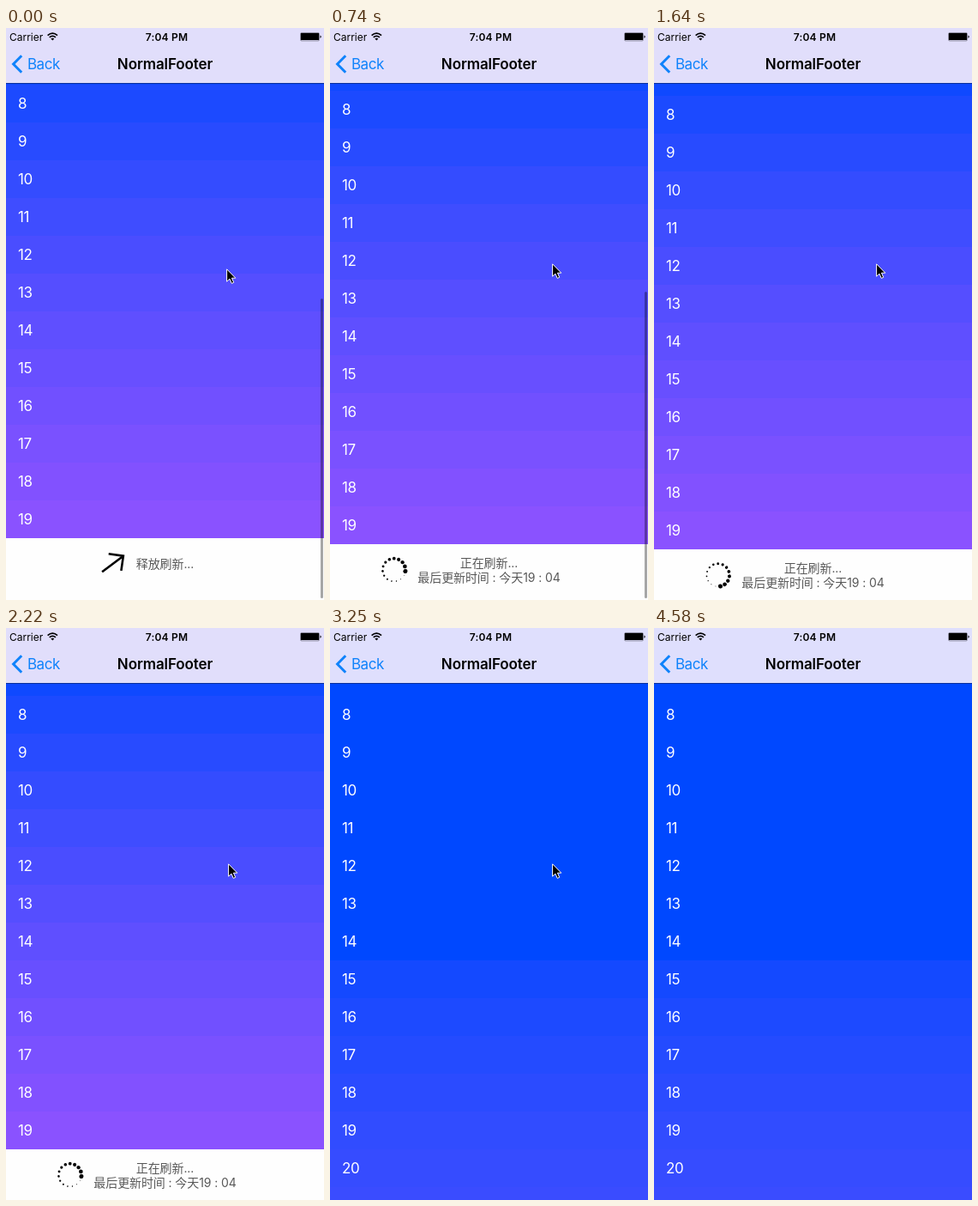
These frames come from a looping animation (371x666 px, 5000 ms). An HTML page:

```html
<!DOCTYPE html>
<html lang="zh">
<head>
<meta charset="utf-8">
<title>NormalFooter</title>
<style>
  html, body { margin: 0; width: 100%; height: 100%; overflow: hidden; background: #fefefe; }
  svg { display: block; width: 371px; height: 666px; }
  text { font-family: Inter, "Noto Sans CJK SC", "Noto Sans CJK", sans-serif; white-space: pre; }
  .row { font-size: 17px; fill: #fff; letter-spacing: -.4px; }
  .note { font-size: 14px; fill: #585858; text-anchor: middle; letter-spacing: -.1px; }
  .title { font-size: 17px; font-weight: 600; text-anchor: middle; letter-spacing: -.1px; }
  .back { font-size: 17px; fill: #1083fb; letter-spacing: -.5px; }
  .status { font-size: 12px; }
  .clock { font-weight: 600; text-anchor: middle; letter-spacing: .2px; }
  rect { shape-rendering: crispEdges; }
</style>
</head>
<body>
<svg viewBox="0 0 371 666">
  <rect width="371" height="666" fill="#fefefe"/>
  <g id="before"></g>
  <g id="after"></g>
  <g id="footer">
    <g id="pull">
      <path id="arrow" d="M-15.5 0H15.5M3.2 -12.2L15.5 0L3.2 12.2" fill="none" stroke="#000" stroke-width="2.6"/>
      <text class="note" x="185.5" y="35">释放刷新...</text>
    </g>
    <g id="load">
      <g id="dots"></g>
      <text class="note" x="185.5" y="27">正在刷新...</text>
      <text class="note" x="185.5" y="43.5">最后更新时间 : 今天19 : 04</text>
    </g>
  </g>
  <rect id="thumb" x="367" width="3" rx="1.5" fill="#000" style="shape-rendering:auto"/>
  <rect id="nav" width="371" height="64"/>
  <rect y="64" width="371" height="1" fill="#0a2f9c"/>
  <text class="status" x="4" y="14.5">Carrier</text>
  <g fill="none" stroke="#000" stroke-width="1.7">
    <path d="M48.6 8.6Q54.3 3.6 60 8.6M50.7 10.9Q54.3 7.8 57.9 10.9"/>
    <path d="M54.3 14.6L52.3 12.5Q54.3 10.9 56.3 12.5Z" fill="#000" stroke="none"/>
  </g>
  <text class="status clock" x="187.5" y="14.5">7:04 PM</text>
  <rect x="343.5" y="5.5" width="22" height="9.5" rx="1.5" fill="none" stroke="#000" stroke-width=".7" opacity=".5" style="shape-rendering:auto"/>
  <rect x="344" y="6" width="21" height="8"/>
  <path d="M366.5 8.5Q369 10.2 366.5 12Z"/>
  <path d="M18.2 32.3L8.6 42L18.2 51.7" fill="none" stroke="#1083fb" stroke-width="3"/>
  <text class="back" x="25" y="48">Back</text>
  <text class="title" x="185.5" y="48">NormalFooter</text>
  <path id="cursor" d="M.6 .8V15.2L3.9 12.1L6.3 17.4L8.7 16.3L6.4 11.2H10.8Z" fill="#000" stroke="#fff" stroke-width="1" stroke-linejoin="round"/>
</svg>
<script>
const LOOP = 5000, RELOAD = 3250, LOADING = 740;
const $ = id => document.getElementById(id);

function add(parent, tag, attrs, text) {
  const el = document.createElementNS('http://www.w3.org/2000/svg', tag);
  for (const k in attrs) el.setAttribute(k, attrs[k]);
  if (text !== undefined) el.textContent = text;
  parent.append(el);
  return el;
}

// Rows sit at 44px pitch; y = 0 is the top of row 8.
function list(parent, last, red) {
  for (let n = 7; n <= last; n++) {
    const y = (n - 8) * 44, r = Math.round(red(n));
    add(parent, 'rect', { y, width: 371, height: 44, fill: `rgb(${r},${Math.round(72 + r / 14)},255)` });
    add(parent, 'text', { class: 'row', x: 14, y: y + 28 }, n);
  }
}
const curve = (k, base, slope, bend) => base + k * (slope - k * bend);
list($('before'), 19, n => curve(n - 8, 28, 12.5, .23));
list($('after'), 21, n => n < 15 ? 0 : curve(n - 15, 20, 9, .45));
$('after').setAttribute('transform', 'translate(0 79)');

const DOTS = 15;
for (let i = 0; i < DOTS; i++) {
  const a = -i * 2 * Math.PI / DOTS;
  add($('dots'), 'circle', { cx: 13.3 * Math.cos(a), cy: 13.3 * Math.sin(a), r: 2.5 * (1 - .9 * i / DOTS) });
}

// time, list end, thumb top, thumb opacity
const scroll = [
  [0, 594, 315, .35], [150, 593, 316, .35], [300, 592, 317, .35], [450, 591, 318, .35],
  [740, 601, 307, .35], [890, 606, 275, .35], [1040, 607, 267, .3],
  [1340, 607, 267, .18], [1490, 607, 267, 0]
];
// time, x, y
const pointer = [
  [0, 257, 280], [150, 257, 278], [300, 258, 276], [450, 259, 274],
  [3550, 259, 290], [3700, 261, 345], [3840, 264, 401],
  [4140, 270, 435], [4290, 297, 497], [4430, 312, 630], [4580, 320, 700]
];
const at = (steps, t) => steps.findLast(s => s[0] <= t);
const move = (el, x, y, rot = 0) => el.setAttribute('transform', `translate(${x} ${y}) rotate(${rot})`);
const show = (el, on) => el.setAttribute('visibility', on ? 'visible' : 'hidden');

function draw(t) {
  const [, end, top, alpha] = at(scroll, t);
  const [, x, y] = at(pointer, t);
  const done = t >= RELOAD, loading = t >= LOADING;
  show($('before'), !done);
  show($('after'), done);
  show($('pull'), !loading);
  show($('load'), loading && !done);
  show($('thumb'), !done);
  move($('before'), 0, end - 528);
  move($('footer'), 0, end);
  move($('arrow'), 124.5, 30, t < 150 ? -37 : -90);
  // The spinner advances three dots per tick; a dot always sits at the very top.
  const tick = Math.floor((t - LOADING + 6) / 147.5);
  move($('dots'), 74.7, 30, 6 + tick * 72);
  $('thumb').setAttribute('y', top);
  $('thumb').setAttribute('height', 664 - top);
  $('thumb').setAttribute('opacity', alpha);
  $('nav').setAttribute('fill', done ? '#dfdffd' : '#e1defb');
  move($('cursor'), x, y);
}

const start = performance.now();
function frame() {
  draw((performance.now() - start) % LOOP);
  requestAnimationFrame(frame);
}
draw(0);
requestAnimationFrame(frame);
</script>
</body>
</html>
```
